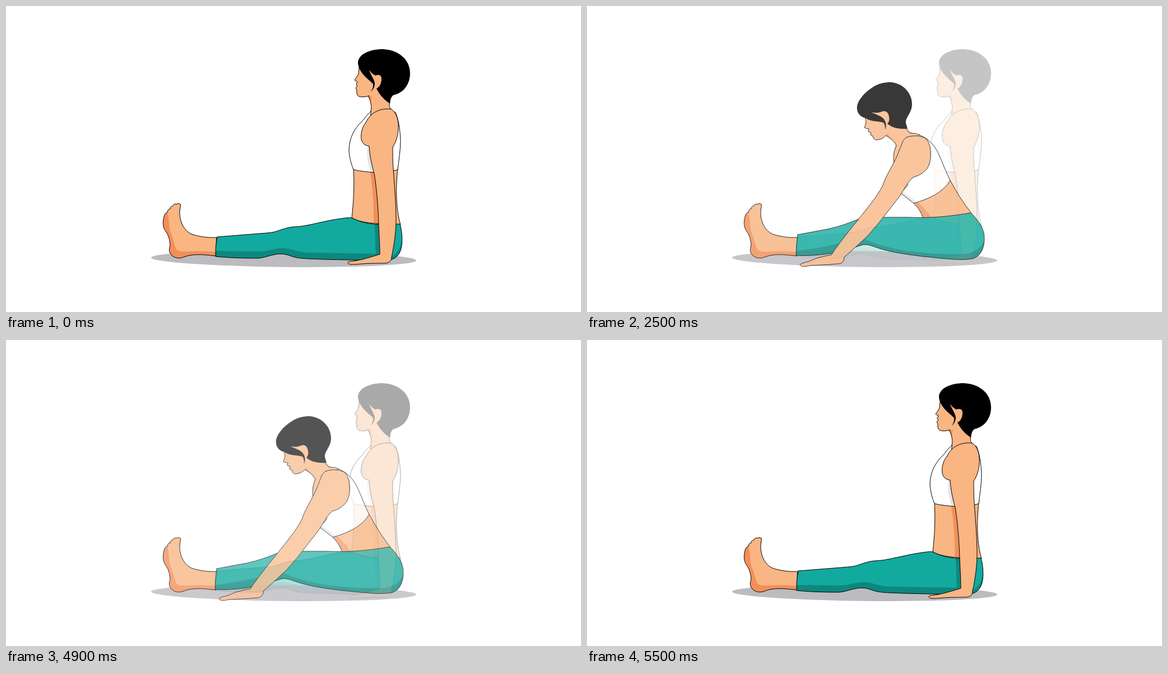
Recreate the animation shown at these times as an HTML page with a canvas. Size 1026 px wide and 546 px high, loop 5.6 s.

```html
<!DOCTYPE html>
<html lang="en">
<head>
<meta charset="utf-8">
<title>Seated stretch</title>
<style>
  html, body { margin: 0; width: 100%; height: 100%; overflow: hidden; background: #fff; }
  canvas { display: block; }
</style>
</head>
<body>
<canvas id="stage" width="1026" height="546"></canvas>
<script>
const W = 1026, H = 546;
const SKIN = '#f9b582', SKIN_DARK = '#f28f58', TEAL = '#12aa9f', TEAL_DARK = '#0e877e';
const GREY = '#e4e5e6', WHITE = '#fff', BLACK = '#000';

function makePose(paint) {
  const layer = document.createElement('canvas');
  layer.width = W;
  layer.height = H;
  const g = layer.getContext('2d');
  g.lineWidth = 1;
  g.lineJoin = g.lineCap = 'round';
  g.strokeStyle = BLACK;
  const fill = (d, color) => {
    g.fillStyle = color;
    g.fill(new Path2D(d));
  };
  const line = d => g.stroke(new Path2D(d));
  // Fills a shape, adds shading clipped to it, then outlines it.
  const part = (d, color, shade, shadeColor) => {
    fill(d, color);
    if (shade) {
      g.save();
      g.clip(new Path2D(d));
      fill(shade, shadeColor);
      g.restore();
    }
    line(d);
  };
  g.fillStyle = '#bcbbc0';
  g.beginPath();
  g.ellipse(495.5, 451.5, 236.5, 14.2, 0.011, 0, Math.PI * 2);
  g.fill();
  part(`M375 413C360 414 342 411 331 407C314 399 309 378 310 366L311.5 354Q308 351 304 353.5
    Q299 352.5 297.5 357Q293 357 293 362Q288 362 288.5 368Q283 369 282 376C279 387 280 395 285 402
    C291 410 292 419 293 427C290 435 291 441 297 446C302 450 310 451 317 448C332 442 350 443 374 446Z`, SKIN,
    `M286 366C293 376 289 392 294 405C300 419 300 430 306 436C314 441 333 435 378 439V460H270V366Z`, SKIN_DARK);
  paint({ fill, line, part });
  return layer;
}

const upright = makePose(({ fill, line, part }) => {
  // torso
  part(`M620 290C622 320 620 352 617 378C632 386 650 389 704 390C696 365 695 325 699 290Z`, SKIN,
    `M649 292C655 325 657 360 656 392H670V292Z`, SKIN_DARK);
  // neck and chest
  fill(`M646 158C651 170 653 180 651 188L634 210L650 230H694V190L684 180L685 170L664 140Z`, SKIN);
  fill(`M645 161L654 157Q650 165 652 179Q650 168 645 161Z`, SKIN_DARK);
  line(`M647 161C651 170 653 180 651 188M685 172C683 178 684 181 687 184`);
  // top
  part(`M651 188C643 195 640 201 635 206C621 219 612 237 612 258C613 274 617 284 620 292
    C632 295 645 296 657 297C676 297 690 295 699 292C701 274 704 256 704 240C703 218 700 201 695 190
    L686 185L660 192L650 206Z`, WHITE,
    `M645 247C643 266 645 285 653 300H668V247Z`, GREY);
  // leggings
  part(`M377 412L465 405C486 404 492 396 513 394C536 394 567 383 600 379Q611 377 617 378
    C632 386 648 389 666 390L703 389C707 402 708 422 705 433C702 445 694 452 684 453
    C650 454 600 453 565 452C538 451 523 451 511 447C498 442 492 442 482 443
    C465 446 458 451 442 450C416 450 394 449 374 447Q373 430 377 412Z`, TEAL,
    `M372 437L449 438C470 438 478 432 495 432C513 433 520 440 542 440L660 442
    C658 423 660 406 657 386H667V443L688 447C699 441 704 430 706 417L715 420V460H372Z`, TEAL_DARK);
  // arm
  part(`M642 208C634 217 633 230 634 238C636 246 641 249 648 250C649 268 653 285 657 299
    C662 330 664 360 665 390C666 412 667 428 667 443C654 447 638 452 627 454C619 456 610 455 610 458
    C611 462 617 461 625 461C642 459 660 459 675 459C684 459 688 455 688 448
    C693 425 696 402 696 380C696 350 693 320 691 290C690 275 690 263 690 252
    C698 239 701 225 700 210C699 197 694 188 687 184C673 182 659 187 651 195C646 200 644 204 642 208Z`, SKIN);
  // face and ear
  fill(`M630 108L629 121Q626 127 622 132Q624 134 627 135L625 140L627 143L624 146L626 150
    Q625 158 629 161Q638 164 648 161L665 158L672 130L660 108Z`, SKIN);
  line(`M630 110L629 121Q626 127 622 132Q624 134 627 135L625 140L627 143L624 146L626 150
    Q625 158 629 161Q638 164 648 160`);
  // hair
  fill(`M628 102C628 85 651 77 672 77C701 78 721 96 721 120C721 141 708 156 691 159
    C686 164 686 168 685 174C677 169 667 160 661 147C666 146 670 138 670 130
    C670 123 665 122 659 124C653 121 651 118 648 114C650 122 657 130 658 138
    Q658 147 651 153Q656 145 655 139C649 132 630 121 628 102Z`, BLACK);
});

const leaning = makePose(({ fill, line, part }) => {
  // torso
  part(`M583 352C592 361 596 368 600 379H640L686 370C672 352 659 332 648 311Z`, SKIN,
    `M580 348L590 349C599 358 608 366 617 380H596Z`, SKIN_DARK);
  // neck and chest
  fill(`M530 230C541 234 549 243 551 249C547 260 546 270 548 280L570 300L598 234
    C587 227 578 228 569 218L542 205Z`, SKIN);
  fill(`M532 231L537 227Q540 236 551 248Q542 236 532 231Z`, SKIN_DARK);
  line(`M533 231C543 236 549 242 552 249C547 260 546 270 548 280M570 219Q573 225 577 227Q586 226 594 230`);
  // top
  part(`M560 334L583 352C611 344 636 332 648 311C640 296 634 278 627 263
    C619 247 608 235 592 230L575 240L572 320Z`, WHITE,
    `M556 328L566 333L590 351L580 356Z`, GREY);
  // leggings
  part(`M376 408L430 398C452 393 468 387 485 380Q505 376 530 377H575C615 379 650 375 685 369
    C695 379 707 394 708.5 408C711 430 703 447 687 451C666 455 634 450 600 447
    C568 443 541 439 520 432C507 428 503 425 492 426C470 433 452 440 437 441
    C413 445 391 446 373 445Q373 428 376 408Z`, TEAL,
    `M372 437C400 434 420 430 445 425L495 416C508 422 532 430 560 435C596 441 650 445 676 442
    C692 440 705 431 709 416L718 420V460H372Z`, TEAL_DARK);
  // arm
  part(`M571 234C582 230 599 231 606 238C615 249 616 276 607 290C600 298 592 303 583 305
    C572 313 566 328 556 342C540 362 521 388 501 410C488 422 471 438 459 448
    C459 456 455 460 447 460C430 462 415 462 400 463C391 464 384 467 380 462
    C382 458 391 458 398 455C410 449 424 446 436 444C445 430 462 408 485 380
    C500 360 516 343 528 320C531 309 538 297 545 284C553 270 558 255 563 243Q566 236 571 234Z`, SKIN);
  // face and ear
  fill(`M495 194Q498 203 498 208L495 217Q498 219 503 219L502 224L507 226L506 230L510 232
    Q511 239 517 239Q528 238 533 231L545 217L542 184Z`, SKIN);
  line(`M496 199Q498 204 498 208L495 217Q498 219 503 219L502 224L507 226L506 230L510 232
    Q511 239 517 239Q528 238 533 231`);
  // hair
  fill(`M482 184C480 171 495 154 510 145C520 138 531 136 542 136C565 138 580 156 580 175
    C580 191 568 198 569 209L572 219C558 220 545 218 536 210C539 207 540 203 539 198
    C538 190 533 186 527 188C521 191 515 191 508 190C516 194 524 195 530 202
    Q536 211 532 221Q532 211 529 208C517 205 505 206 497 200C488 198 482 191 482 184Z`, BLACK);
});

const stage = document.getElementById('stage').getContext('2d');
const LOOP = 5600, FADE_STEPS = 9, STEP = 100;
const fade = (t, start) =>
  Math.min(FADE_STEPS, Math.max(0, Math.floor((t - start) / STEP) + 1)) / FADE_STEPS;

function render(now) {
  const t = now % LOOP;
  const lean = fade(t, 1900) - fade(t, 4700);
  stage.globalAlpha = 1;
  stage.fillStyle = WHITE;
  stage.fillRect(0, 0, W, H);
  stage.globalAlpha = 1 - lean;
  stage.drawImage(upright, 0, 0);
  stage.globalAlpha = lean;
  stage.drawImage(leaning, 0, 0);
}

const origin = performance.now();
function tick() {
  render(performance.now() - origin);
  requestAnimationFrame(tick);
}
tick();
</script>
</body>
</html>
```
